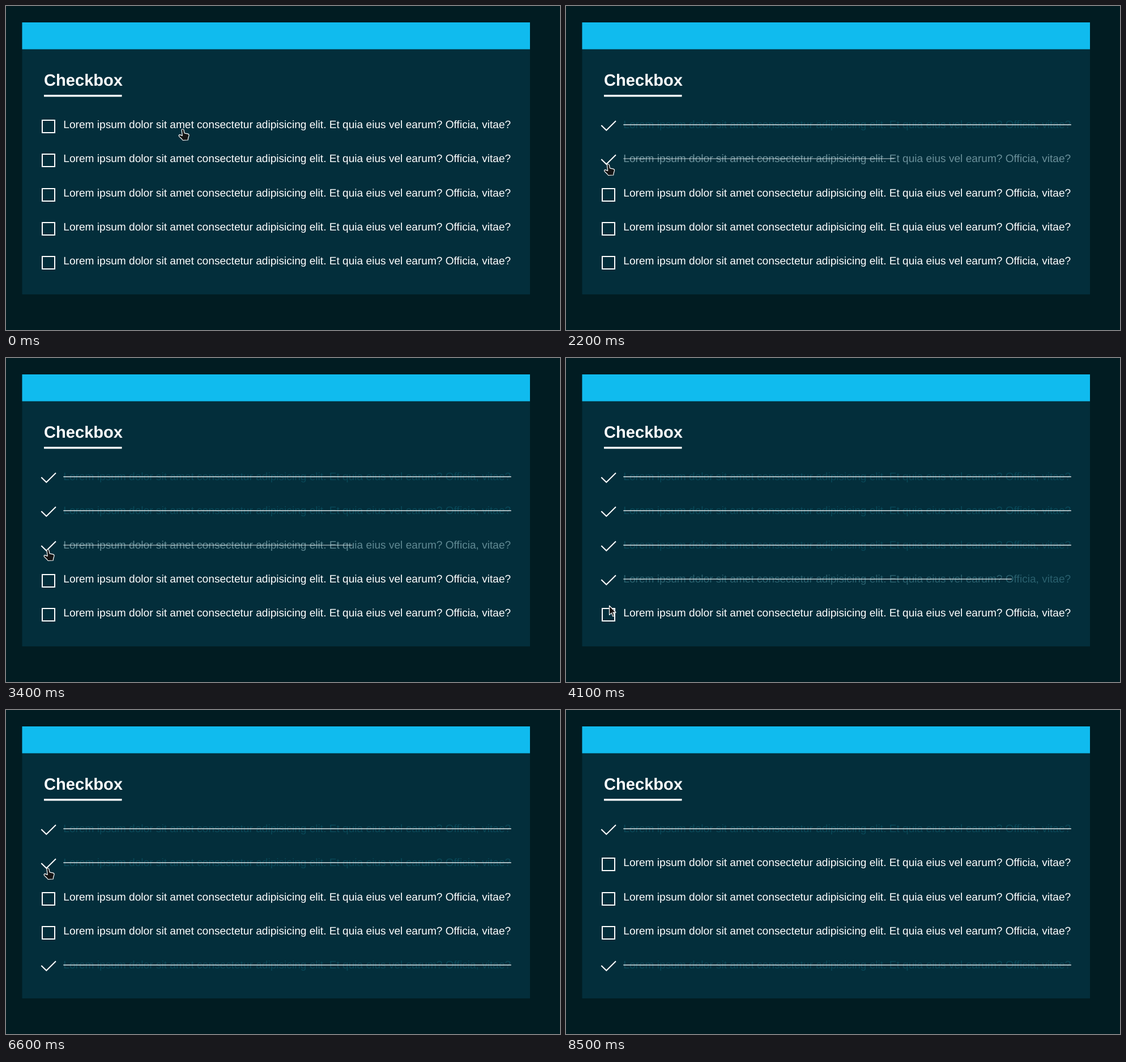
These frames come from a looping animation (978 px wide and 573 px high, 8700 ms). An HTML page:

```html
<!DOCTYPE html>
<html lang="en">
<head>
<meta charset="utf-8">
<title>Checkbox</title>
<style>
  html, body { margin: 0; width: 100%; height: 100%; overflow: hidden; background: #011c22; }
  svg { display: block; width: 978px; height: 573px; }
  text { font-family: "Liberation Sans", Arial, sans-serif; text-rendering: geometricPrecision; white-space: pre; }
  .title { font-size: 29.1px; font-weight: bold; fill: #fff; }
  .label { font-size: 19.13px; }
  .box, .tick { fill: none; stroke: #fff; stroke-width: 2; }
  .pointer { fill: #151515; stroke: #fff; stroke-width: 1.2; stroke-linejoin: round; }
</style>
</head>
<body>
<svg id="stage" viewBox="0 0 978 573" xmlns="http://www.w3.org/2000/svg">
  <rect width="978" height="573" fill="#011c22"/>
  <rect x="28.5" y="29" width="896.5" height="481" fill="#032e3b"/>
  <rect x="28.5" y="29" width="896.5" height="47.5" fill="#10bbee"/>
  <text class="title" x="67" y="141">Checkbox</text>
  <rect x="67" y="157" width="137.5" height="3.5" fill="#fff"/>
  <g id="list"></g>
  <g id="cursor">
    <path id="arrow" class="pointer" d="M0 0V16.4L3.8 12.9L6.2 18.9L9 17.7L6.5 11.9H11.6Z"/>
    <path id="hand" class="pointer" d="M-2 2.4C-2 .2 1.5 .2 1.9 2.4L3 7.8L9 9.2Q11.4 9.9 11 12.2L9.6 17L9.2 20L.2 20.5L-1.8 18L-6.4 13.6Q-7.8 11 -5.2 10.6L-.8 12.4Z"/>
  </g>
</svg>
<script>
const LOOP = 8700, STEP = 100, FADE = 400;
const LEFT = 101.3, WIDTH = 790.5, PITCH = 60.25;
const LABEL = "Lorem ipsum dolor sit amet consectetur adipisicing elit. Et quia eius vel earum? Officia, vitae?";
const DIM = [9, 72, 88], LIT = [255, 255, 255];

// Times at which each row is checked and unchecked again
const toggles = [[930], [2060, 6720], [3250, 6170], [3870, 5510], [4440]];
const selection = { row: 2, from: 2580, to: 3250 };
// Steps during which the picture rests
const rests = new Set([900, 1600, 2000, 3000, 3200, 3500, 4700, 5400, 6700, 7400, 7600, 8600]);

// time, x, y, shape that applies from that time on
const track = [
  [0, 312, 217, "hand"], [250, 272, 219, "hand"], [500, 172, 214, "hand"],
  [700, 100, 210, "hand"], [800, 79, 209.5, "hand"], [1000, 77, 212, "hand"],
  [1150, 77, 218, "hand"], [1250, 80, 245, "arrow"], [1500, 85, 300.5, "arrow"],
  [1700, 79, 292, "arrow"], [1800, 74, 280, "hand"], [2100, 73, 274, "hand"],
  [2300, 76, 284, "hand"], [2400, 80, 300, "arrow"], [2700, 86, 343, "arrow"],
  [2900, 85, 363, "arrow"], [3100, 75, 365, "arrow"], [3200, 74, 342, "hand"],
  [3400, 74, 338, "hand"], [3600, 75, 362, "arrow"], [3700, 75, 385, "hand"],
  [3900, 75, 396, "hand"], [4000, 76, 416, "arrow"], [4100, 76.5, 438, "arrow"],
  [4200, 76, 447, "hand"], [4400, 75, 452, "hand"], [4800, 75, 450, "hand"],
  [5000, 75, 430, "arrow"], [5200, 74, 403, "hand"], [5300, 74, 399, "hand"],
  [5600, 76, 394.5, "hand"], [5750, 75, 390, "hand"], [5900, 75, 362, "arrow"],
  [6000, 74, 342, "hand"], [6200, 73, 332, "hand"], [6300, 73, 288, "arrow"],
  [6400, 73, 282, "hand"], [6600, 74, 279, "hand"], [6850, 74, 278, "hand"],
  [7000, 75, 256, "arrow"], [7300, 75, 219.5, "arrow"], [7700, 75, 219.5, "arrow"],
  [7900, 73, 190, "arrow"], [8400, 59, 14, "arrow"], [8450, 59, 14, "none"]
];

const byId = id => document.getElementById(id);
const set = (el, attrs) => {
  for (const key in attrs) el.setAttribute(key, attrs[key]);
  return el;
};
const add = (parent, tag, attrs) =>
  parent.appendChild(set(document.createElementNS("http://www.w3.org/2000/svg", tag), attrs));
const show = (el, on) => set(el, { visibility: on ? "visible" : "hidden" });
const mix = (a, b, k) => a + (b - a) * k;

// The CSS "ease" curve
function ease(x) {
  if (x <= 0) return 0;
  if (x >= 1) return 1;
  let lo = 0, hi = 1;
  const bez = (a, b, s) => 3 * a * s * (1 - s) ** 2 + 3 * b * s * s * (1 - s) + s ** 3;
  for (let i = 0; i < 24; i++) {
    const mid = (lo + hi) / 2;
    if (bez(.25, .25, mid) < x) lo = mid; else hi = mid;
  }
  return bez(.1, 1, lo);
}

const rows = toggles.map(([on, off = Infinity], i) => {
  const g = add(byId("list"), "g", {});
  const at = y => Math.round(y + i * PITCH);
  const boxY = at(201);
  const mark = add(g, "rect", { x: LEFT, y: at(199), width: 795.5, height: 22, fill: "#0770d0" });
  const text = add(g, "text", { class: "label", x: LEFT, y: at(216) });
  text.textContent = LABEL;
  return {
    on, off, mark, text,
    strike: add(g, "rect", { y: at(209), height: 2, fill: "#fff" }),
    box: add(g, "rect", { class: "box", x: 64, y: boxY + 1, width: 22, height: 22 }),
    tick: add(g, "path", { class: "tick", d: `M62.3 ${boxY + 10}L71.3 ${boxY + 18.8}L88 ${boxY + 2.3}` })
  };
});

function drawRow(row, i, t) {
  const leaving = t >= row.off;
  const gone = ease((t - row.off) / FADE);
  const done = leaving ? 1 - gone : ease((t - row.on) / FADE);
  const checked = t >= row.on && !leaving;
  show(row.tick, checked);
  show(row.box, !checked);
  show(row.mark, i === selection.row && t >= selection.from && t < selection.to);
  const rgb = LIT.map((c, k) => Math.round(mix(c, DIM[k], done)));
  set(row.text, { fill: `rgb(${rgb})` });
  // Grows from the left, leaves towards the right
  set(row.strike, {
    x: leaving ? LEFT + WIDTH * gone : LEFT,
    width: WIDTH * done,
    opacity: .65 * done
  });
}

function drawCursor(t) {
  let i = track.length - 1;
  while (track[i][0] > t) i--;
  const a = track[i], b = track[i + 1] || a;
  const k = b === a ? 0 : (t - a[0]) / (b[0] - a[0]);
  set(byId("cursor"), { transform: `translate(${mix(a[1], b[1], k)} ${mix(a[2], b[2], k)})` });
  show(byId("arrow"), a[3] === "arrow");
  show(byId("hand"), a[3] === "hand");
}

function draw(now) {
  let t = Math.floor((now % LOOP) / STEP) * STEP;
  if (rests.has(t)) t -= STEP;
  rows.forEach((row, i) => drawRow(row, i, t));
  drawCursor(t);
}

const start = performance.now();
function tick() {
  draw(performance.now() - start);
  requestAnimationFrame(tick);
}
tick();
</script>
</body>
</html>
```
